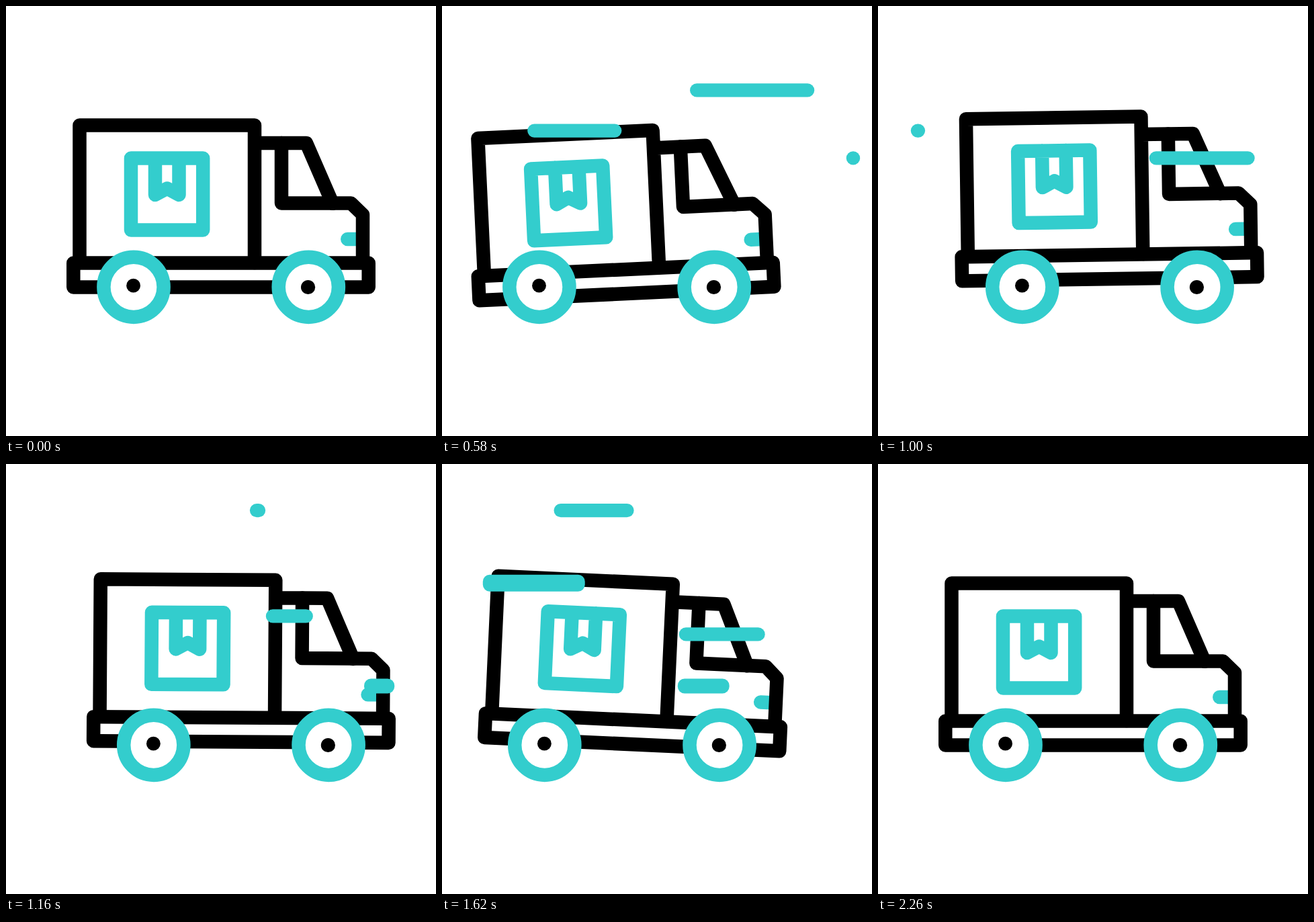
Recreate the animation shown at these times as an HTML page. Size 640x640 px, loop 2.4 s.

```html
<!DOCTYPE html>
<html lang="en">
<head>
<meta charset="utf-8">
<title>Delivery truck</title>
<style>
  html, body { margin: 0; width: 100%; height: 100%; overflow: hidden; background: #fff; }
  svg { display: block; width: 100vw; height: 100vh; }
  .ink, .teal { fill: none; stroke-width: 20.5; stroke-linecap: round; stroke-linejoin: round; }
  .ink { stroke: #000; }
  .teal { stroke: #33cdcd; }
  .wheel { fill: #fff; }
  #lines { fill: #33cdcd; }
</style>
</head>
<body>
<svg viewBox="0 0 640 640">
  <g id="body">
    <path class="teal" d="M186 226.5H293.2V333.5H186ZM222 226.5V281L239.8 271.5L257.5 281V226.5"/>
    <path class="teal" d="M508.3 347H524"/>
    <path class="ink" d="M109.5 382V177.5H370V382M370 204H447L486 293.8"/>
    <path class="ink" d="M410 204V293.5H513.5L531 310.5V382"/>
    <path class="ink" d="M100.3 382.5H539.7V418.5H100.3Z"/>
  </g>
  <g id="wheels">
    <circle class="teal wheel" cx="190" cy="418.3" r="44.6"/>
    <circle class="teal wheel" cx="450.3" cy="418.3" r="44.6"/>
    <circle cx="189.6" cy="416.2" r="10.4"/>
    <circle cx="449.6" cy="418.5" r="10.6"/>
  </g>
  <g id="lines"></g>
</svg>
<script>
const LOOP = 2400;
const SWEEP = 735; // life of one wind line, ms
const CAP = 10.2;

// Truck poses: [time in ms, value]
const shift = [[0, 0], [555, -45.6], [1104, 32], [1637, -37.4], [2150, 0]];
const tilt = [[0, 0], [570, -2.68], [1650, 2.65], [2130, 0]];
const bounce = [[0, 0], [555, 9.7], [1020, -12.4], [1360, 7.5], [1860, -9], [2160, 0]];

const winds = [
  { y: 125.4, start: 265, right: 555, length: 263 },
  { y: 185.6, start: 285, right: 261, length: 202 },
  { y: 226.4, start: 575, right: 612, length: 215 },
  { y: 330.5, start: 1050, right: 568, length: 207, height: 22 },
  { y: 69.1, start: 1124, right: 376, length: 200 },
  { y: 177.3, start: 1184, right: 270, length: 212, height: 25 },
  { y: 253.4, start: 1350, right: 471, length: 200 }
];

const byId = id => document.getElementById(id);
const body = byId("body"), wheels = byId("wheels");

function ease(t, from, to) {
  const p = Math.min(1, Math.max(0, (t - from) / (to - from)));
  return p * p * (3 - 2 * p);
}

function valueAt(keys, t) {
  return keys.slice(1).reduce((v, [time, value], i) =>
    v + (value - keys[i][1]) * ease(t, keys[i][0], time), keys[0][1]);
}

for (const wind of winds) {
  const { y, height = 2 * CAP } = wind;
  wind.bar = document.createElementNS("http://www.w3.org/2000/svg", "rect");
  wind.bar.setAttribute("y", y - height / 2);
  wind.bar.setAttribute("height", height);
  wind.bar.setAttribute("rx", CAP);
  byId("lines").append(wind.bar);
}

// The left end runs ahead, the right end catches up.
function drawWind({ bar, start, right, length }, t) {
  const p = (t - start) / SWEEP;
  const lead = right - length * ease(p, 0, 0.7);
  const trail = right - length * ease(p, 0.35, 1);
  bar.setAttribute("x", lead - CAP);
  bar.setAttribute("width", trail - lead + 2 * CAP);
  bar.setAttribute("visibility", p >= 0 && p < 1 ? "visible" : "hidden");
}

function draw(t) {
  const x = valueAt(shift, t);
  wheels.setAttribute("transform", `translate(${x} 0)`);
  body.setAttribute("transform",
    `translate(${x} ${valueAt(bounce, t)}) rotate(${valueAt(tilt, t)} 320 418)`);
  for (const wind of winds) drawWind(wind, t);
}

const begin = performance.now();
function tick() {
  draw((performance.now() - begin) % LOOP);
  requestAnimationFrame(tick);
}
tick();
</script>
</body>
</html>
```
